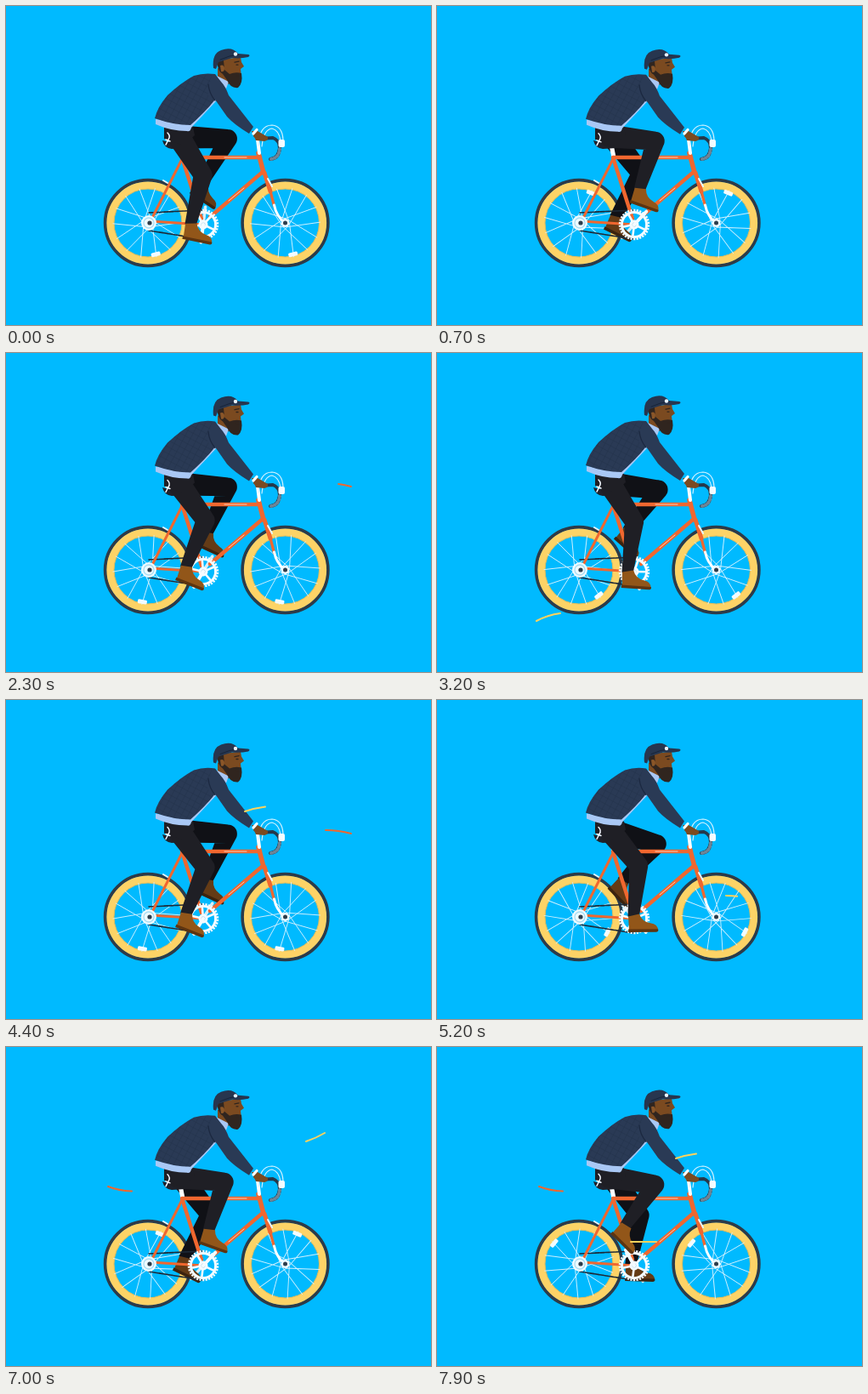
Recreate the animation shown at these times as an HTML page. Size 500 by 375 pixels, loop 8000 ms.

```html
<!DOCTYPE html>
<html lang="en">
<head>
<meta charset="utf-8">
<title>Cyclist</title>
<style>
  html, body { margin: 0; width: 100%; height: 100%; overflow: hidden; background: #00baff; }
  svg { display: block; width: 100vw; height: 100vh; }
  .line { fill: none; stroke-linecap: round; stroke-linejoin: round; }
</style>
</head>
<body>
<svg viewBox="0 0 500 375">
  <defs>
    <pattern id="quilt" width="7" height="7" patternUnits="userSpaceOnUse" patternTransform="rotate(28)">
      <path d="M0 0H7M0 0V7" fill="none" stroke="#1d2b42" stroke-width=".9"/>
    </pattern>
  </defs>
  <rect width="500" height="375" fill="#00baff"/>

  <g id="wheels"></g>

  <!-- far leg -->
  <path id="farCrank" class="line" stroke="#d9eef7" stroke-width="3.5"/>
  <path id="farLeg" fill="#101116"/>
  <g id="farBoot"></g>

  <!-- bicycle -->
  <path class="line" stroke="#1d2a38" stroke-width="1.6" stroke-dasharray="5 1" d="M168 243L231 240M168 264L231 274"/>
  <path fill="#fff" d="M203 166L208 165L211 180L206 181Z"/>
  <path fill="#20222b" d="M184 158Q197 162 212 161Q216 164 211 167L195 168Q186 167 184 158Z"/>
  <g class="line" stroke="#f0672f">
    <path stroke-width="3" d="M207 180L170 253L232 257"/>
    <path stroke-width="4.4" d="M207 178L230 250M207 178H299M302 195L240 248"/>
    <path stroke-width="5.5" d="M297 173L303 196"/>
    <path stroke-width="5" d="M304 196L311 218"/>
    <path stroke-width="3.2" d="M310 214L315.5 235"/>
  </g>
  <path class="line" stroke="#ffd0b5" stroke-width="1" d="M257 178H283M262 229L280 214"/>
  <path class="line" stroke="#fff" stroke-width="3" d="M315.5 234Q318 247 328 255"/>
  <path class="line" stroke="#e8f8ff" stroke-width="2" d="M308 203L313 212M185 205L190 208"/>
  <circle cx="168" cy="255" r="9" fill="#eefaff"/>
  <circle cx="168" cy="255" r="6" fill="none" stroke="#a9ddf2" stroke-width="1.3"/>
  <circle cx="169" cy="255" r="2.6" fill="#2d3d4c"/>
  <circle cx="328.5" cy="255" r="5" fill="#eefaff"/>
  <circle cx="328.5" cy="255" r="2.5" fill="#2d3d4c"/>
  <path class="line" stroke="#fff" stroke-width="4" d="M296 157L298 173"/>
  <path class="line" stroke="#d8f3ff" stroke-width="1.2" d="M297 164Q298 140 313 140Q325 141 326 157M301 165Q303 145 313 144Q321 146 323 158"/>
  <path class="line" stroke="#26384a" stroke-width="4" d="M298 156L314 155Q322 158 322 167Q321 179 311 180"/>
  <path class="line" stroke="#6e8496" stroke-width="4" stroke-dasharray="1 3" stroke-linecap="butt" d="M322 168Q321 179 311 180"/>
  <rect x="320.500" y="157" width="7.500" height="9" rx="2" fill="#f4fbff"/>

  <g id="chainring" class="line" stroke="#f4fbff">
    <circle r="17" stroke-width="2.5" stroke-dasharray="2.200 1.360" stroke-linecap="butt"/>
    <circle r="14.600" stroke-width="3"/>
    <g id="arms" stroke-width="2.600"></g>
    <circle r="4" stroke-width="3" fill="#b9d9e8"/>
  </g>
  <path id="nearCrank" class="line" stroke="#f4fbff" stroke-width="4"/>

  <!-- near leg -->
  <path id="nearLeg" fill="#1f1f25"/>
  <g id="nearBoot"></g>

  <!-- rider -->
  <path class="line" stroke="#7b4a20" stroke-width="6" d="M294 152L303 155"/>
  <path fill="#7b4a20" d="M289 147L296 147L308 154Q309 158 304 159L294 158Z"/>
  <g id="torso">
    <path fill="#1f1f25" d="M186 141L220 142L222 152L208 164L186 156Z"/>
    <path class="line" stroke="#f4f8ff" stroke-width="1.500" d="M190 149Q194 153 191 157L188 163M188 157L193 159"/>
    <path fill="#7b4a20" d="M249 73L264 78L262 92L249 84Z"/>
    <path fill="#a9c8f5" d="M248 82L262 89L259 97L250 92ZM176 133L214 139L246 106L247 112L218 143Q217 148 213 147Q194 147 176 139Z"/>
    <path id="jacket" fill="#2a3a55" d="M221 82Q233 78 246 80L253 89Q258 94 262 105L291 142L286 150Q268 139 260 130L246 110Q234 125 217 140Q197 140 175 132Q178 119 190 105Q206 90 221 82Z"/>
    <path fill="url(#quilt)" opacity=".65" d="M221 82L242 81L237 104L246 110Q234 125 217 140Q197 140 175 132Q178 119 190 105Q206 90 221 82Z"/>
    <path class="line" stroke="#1c2940" stroke-width="1.300" d="M238 92Q239 103 246 111"/>
    <path fill="#7b4a20" d="M253 63L276 60L277 66L280 71L276 74L277 84H255Z"/>
    <path fill="#30251f" d="M248 64H256L257 75L263 80Q270 77 277 79Q279 91 273 96Q264 97 260 87L255 80Q249 77 248 64Z"/>
    <path fill="#8b5628" d="M252 70Q256 68 257 73Q257 78 253 77Z"/>
    <path class="line" stroke="#30251f" stroke-width="1.300" d="M269 66L274 65M271 69H273M271 82L276 82"/>
    <path fill="#27364f" d="M244 73Q242 56 253 52Q266 47 273 56L285 57Q288 58 285 60Q276 62 266 61L250 66L247 74Z"/>
    <path class="line" stroke="#17243a" stroke-width="1" d="M252 63Q263 58 273 57"/>
    <circle cx="270" cy="56.500" r="2.200" fill="#e9f4ff"/>
  </g>
  <path class="line" stroke="#fff" stroke-width="3.200" d="M291 150L295 145.500"/>

  <g id="streaks" class="line" stroke-width="2"></g>
</svg>
<script>
const LOOP = 8000, STEP = 70, TURN = 24;
const RAD = Math.PI / 180;
const $ = id => document.getElementById(id);
const polar = (r, deg, x = 0, y = 0) => [x + r * Math.cos(deg * RAD), y + r * Math.sin(deg * RAD)];
const pt = p => p.map(v => v.toFixed(2)).join(' ');

const YELLOW = '#ffd35c', RED = '#f0672f', WHITE = '#d9f4ff';
const streakShapes = {
  right: [RED, 'M376 153Q391 153 406 157'],
  highRight: [YELLOW, 'M353 93Q365 89 375 83'],
  midRight: [YELLOW, 'M353 111Q365 107 375 101'],
  highLeft: [YELLOW, 'M134 72Q146 73 158 77'],
  hub: [YELLOW, 'M313 247Q327 246 341 248'],
  saddle: [RED, 'M208 168L234 166.5'],
  ground: [YELLOW, 'M117 315Q130 308 145 306'],
  hand: [YELLOW, 'M281 131Q293 127 305 125.500'],
  tube: [WHITE, 'M264 199Q293 196 322 191'],
  rim: [YELLOW, 'M340 230Q355 230 366 233'],
  left: [RED, 'M120 164Q133 169 148 169.500'],
  crank: [YELLOW, 'M228 229H258']
};
// Step at which each streak is at full length
const schedule = {
  right: [8, 27, 33, 51, 62, 80, 92], highRight: [20], midRight: [100],
  highLeft: [20, 68], hub: [20], saddle: [20, 106], ground: [45],
  hand: [12, 62, 112], tube: [57, 85], rim: [73, 85], left: [38, 100, 112], crank: [112]
};

function wheel(x) {
  let spokes = '';
  for (let i = 0; i < 14; i++) {
    const a = i * 360 / 14;
    spokes += `M${pt(polar(5, a + (i % 2 ? 75 : -75)))}L${pt(polar(41, a))}`;
  }
  return `<g transform="translate(${x} 255)">
    <circle r="50.200" fill="none" stroke="#2c3b49" stroke-width="4"/>
    <circle r="44.300" fill="none" stroke="#fdd366" stroke-width="8.600"/>
    <circle r="40" fill="none" stroke="#e6bd5a" stroke-width="1"/>
    <g class="spin"><path class="line" stroke="#d3f1ff" stroke-width=".9" d="${spokes}"/>
    <rect x="35.500" y="-5.500" width="5" height="11" rx="1.500" fill="#f2fbff"/></g></g>`;
}

const boot = (leather, sole) => `
  <path fill="${leather}" d="M-21 0L-22 -17L-9 -20Q-6 -11 4 -9Q13 -8 13 0Z"/>
  <path fill="${sole}" d="M-22 -2L13 -2Q14 1 11 1.500H-22Z"/>`;

function taper(a, b, wa, wb) {
  const dir = Math.atan2(b[1] - a[1], b[0] - a[0]) / RAD;
  const corner = (p, w, side) => pt(polar(w / 2, dir + side, ...p));
  return `M${corner(a, wa, -90)}L${corner(b, wb, -90)}L${corner(b, wb, 90)}L${corner(a, wa, 90)}Z`;
}

function disc([x, y], r) {
  return `M${pt([x - r, y])}a${r} ${r} 0 1 1 ${2 * r} 0a${r} ${r} 0 1 1 ${-2 * r} 0`;
}

function placeLeg(side, hip, angle) {
  const thigh = 54, shin = 61;
  const ball = polar(23, angle, 232, 254);
  const tilt = 23 + 24 * Math.cos((angle - 215) * RAD);
  const ankle = polar(Math.hypot(16, 16), tilt + 225, ...ball);
  const dx = ankle[0] - hip[0], dy = ankle[1] - hip[1], d = Math.hypot(dx, dy);
  const bend = Math.acos(Math.min(1, (thigh ** 2 + d ** 2 - shin ** 2) / (2 * thigh * d))) / RAD;
  const knee = polar(thigh, Math.atan2(dy, dx) / RAD - bend, ...hip);
  $(side + 'Leg').setAttribute('d',
    disc(hip, 13) + taper(hip, knee, 27, 22) + disc(knee, 11) + taper(knee, ankle, 22, 13));
  $(side + 'Boot').setAttribute('transform', `translate(${pt(ball)}) rotate(${tilt.toFixed(2)})`);
  $(side + 'Crank').setAttribute('d', `M232 257L${pt(polar(21, angle, 232, 257))}`);
}

$('wheels').innerHTML = wheel(167) + wheel(328.5);
$('nearBoot').innerHTML = boot('#925619', '#5d3410');
$('farBoot').innerHTML = boot('#643b16', '#3b230f');
$('arms').innerHTML = [0, 72, 144, 216, 288].map(a => `<path d="M0 0L${pt(polar(14, a))}"/>`).join('');
const spinners = document.querySelectorAll('.spin');
const streaks = Object.entries(streakShapes).map(([name, [color, d]]) => {
  const path = document.createElementNS('http://www.w3.org/2000/svg', 'path');
  path.setAttribute('d', d);
  path.setAttribute('stroke', color);
  path.setAttribute('pathLength', 1);
  $('streaks').append(path);
  return { path, peaks: schedule[name] };
});

function render(time) {
  const step = Math.floor(time / STEP);
  const turned = Math.max(0, step - 1) * TURN;
  const pedal = 97 + turned;
  for (const s of spinners) s.setAttribute('transform', `rotate(${76 + turned})`);
  $('chainring').setAttribute('transform', `translate(232 257) rotate(${pedal})`);
  placeLeg('near', [203, 153], pedal);
  placeLeg('far', [207, 154], pedal + 180);
  const bob = 0.75 - 0.75 * Math.cos(2 * (pedal - 85) * RAD);
  $('torso').setAttribute('transform', `translate(0 ${bob.toFixed(2)})`);

  // Each streak enters from its right end and leaves by its left end
  for (const { path, peaks } of streaks) {
    const peak = peaks.find(p => Math.abs(step - p) <= 1);
    path.style.display = peak === undefined ? 'none' : '';
    if (peak === undefined) continue;
    const age = step - peak;
    path.setAttribute('stroke-dasharray', age ? '.5 2' : '1 2');
    path.setAttribute('stroke-dashoffset', age < 0 ? -0.5 : 0);
  }
}

const start = performance.now();
function tick() {
  render((performance.now() - start) % LOOP);
  requestAnimationFrame(tick);
}
tick();
</script>
</body>
</html>
```
